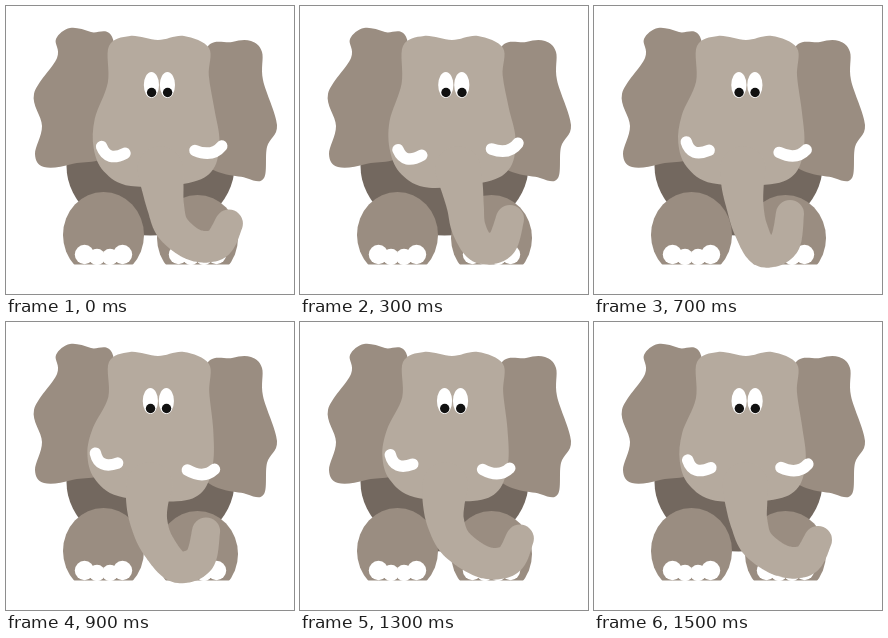
Animation of 288x288 px, one loop 1600 ms. Source, as an HTML page with a canvas:

```html
<!DOCTYPE html>
<html lang="en">
<head>
<meta charset="utf-8">
<title>Elephant</title>
<style>
  html, body { margin: 0; width: 100%; height: 100%; overflow: hidden; background: #fff; }
  canvas { display: block; width: 288px; height: 288px; }
</style>
</head>
<body>
<canvas id="stage" width="288" height="288"></canvas>
<script>
const ctx = document.getElementById('stage').getContext('2d');
const LOOP = 1600, STEP = 100;
const SKIN = '#b5aa9e', SHADE = '#9a8d81', DARK = '#73685f', WHITE = '#fff', BLACK = '#111';

// Key points of the smooth outlines
const leftEar = [[108, 37], [85, 26], [64, 22], [50, 33], [51, 52], [28, 88], [36, 120],
  [29, 148], [38, 161], [66, 158], [108, 140]];
const rightEar = [[198, 48], [226, 36], [245, 35], [256, 46], [257, 74], [271, 119],
  [261, 141], [258, 172], [240, 172], [195, 150]];
const head = [[103, 40], [124, 30], [152, 34], [178, 30], [203, 42], [203, 70], [208, 105],
  [211, 138], [203, 166], [178, 178], [120, 178], [94, 162], [85, 138], [88, 110], [102, 76]];

// Trunk joints from root to tip; each sways on its own delayed cosine
const trunk = [
  { x: 150, y: 163, dx: 8, dy: 0, peak: 260, r: 23 },
  { x: 150.5, y: 180, dx: 11.5, dy: 0, peak: 260, r: 21 },
  { x: 153, y: 200, dx: 12.5, dy: 0, peak: 260, r: 18.5 },
  { x: 160, y: 222, dx: 9.5, dy: 0, peak: 200, r: 17 },
  { x: 179, y: 242, dx: 10, dy: -3, peak: -50, r: 16 },
  { x: 201, y: 238, dx: 11, dy: 0, peak: -100, r: 15.5 },
  { x: 210, y: 213, dx: 14, dy: 5, peak: -100, r: 14 }
];

const wave = (t, peak) => Math.cos(2 * Math.PI * (t - peak) / LOOP);

// The crown stays put while the lower face swings
function swing([x, y], angle) {
  const w = angle * Math.min(1, Math.max(0, (y - 60) / 70));
  const dx = x - 160, dy = y - 92, c = Math.cos(w), s = Math.sin(w);
  return [160 + dx * c - dy * s, 92 + dx * s + dy * c];
}

function blob(points, color) {
  const n = points.length, at = i => points[(i + n) % n];
  ctx.beginPath();
  ctx.moveTo(...points[0]);
  for (let i = 0; i < n; i++) {
    const p = at(i - 1), a = at(i), b = at(i + 1), q = at(i + 2);
    ctx.bezierCurveTo(a[0] + (b[0] - p[0]) / 6, a[1] + (b[1] - p[1]) / 6,
      b[0] - (q[0] - a[0]) / 6, b[1] - (q[1] - a[1]) / 6, b[0], b[1]);
  }
  ctx.fillStyle = color;
  ctx.fill();
}

function oval(x, y, rx, ry, color) {
  ctx.beginPath();
  ctx.ellipse(x, y, rx, ry, 0, 0, 2 * Math.PI);
  ctx.fillStyle = color;
  ctx.fill();
}

function foot(x, y) {
  oval(x, y, 40.5, 43, SHADE);
  ctx.fillStyle = WHITE;
  ctx.fillRect(x - 42, 258.5, 84, 20);
  for (const side of [-1, 1]) {
    oval(x + side * 19, 248.5, 9.7, 9.7, WHITE);
    oval(x + side * 6.5, 251, 8.2, 8.2, WHITE);
  }
}

function drawTrunk(t) {
  const knots = trunk.map(j => {
    const k = wave(t, j.peak);
    return [j.x + j.dx * k, j.y + j.dy * k, j.r];
  });
  const last = knots.length - 1, at = i => knots[Math.min(last, Math.max(0, i))];
  ctx.beginPath();
  for (let i = 0; i < last; i++) {
    const p = at(i - 1), a = at(i), b = at(i + 1), q = at(i + 2);
    for (let u = 0; u <= 1; u += 1 / 32) {
      const [x, y, r] = a.map((v, c) => v + u / 2 * (b[c] - p[c]
        + u * (2 * p[c] - 5 * v + 4 * b[c] - q[c] + u * (3 * (v - b[c]) + q[c] - p[c]))));
      ctx.moveTo(x + r, y);
      ctx.arc(x, y, r, 0, 2 * Math.PI);
    }
  }
  ctx.fillStyle = SKIN;
  ctx.fill();
}

function tusk(points, angle) {
  const [a, b, c] = points.map(p => swing(p, angle));
  ctx.beginPath();
  ctx.moveTo(...a);
  ctx.quadraticCurveTo(...b, ...c);
  ctx.strokeStyle = WHITE;
  ctx.lineWidth = 11.5;
  ctx.lineCap = 'round';
  ctx.stroke();
}

function eye(x, y) {
  oval(x, y, 7.6, 13, WHITE);
  oval(x + 0.2, y + 7.5, 4.7, 4.7, BLACK);
}

function draw(t) {
  const sway = wave(t, 260), angle = -0.105 * sway;
  ctx.fillStyle = WHITE;
  ctx.fillRect(0, 0, 288, 288);

  oval(144.5, 160, 84, 69.5, DARK);
  blob(leftEar, SHADE);
  blob(rightEar, SHADE);
  foot(97.5, 229);
  foot(191.5, 232);

  blob(head.map(p => swing(p, angle)), SKIN);
  drawTrunk(t);
  tusk([[93, 137], [98, 153], [116, 145]], angle);
  tusk([[186, 146], [203, 154], [213, 143]], angle);
  eye(145 + 0.8 * sway, 79);
  eye(161 + 0.8 * sway, 79);
}

const start = performance.now();
function tick() {
  const t = (performance.now() - start) % LOOP;
  draw(Math.floor(t / STEP) * STEP);
  requestAnimationFrame(tick);
}
tick();
</script>
</body>
</html>
```
